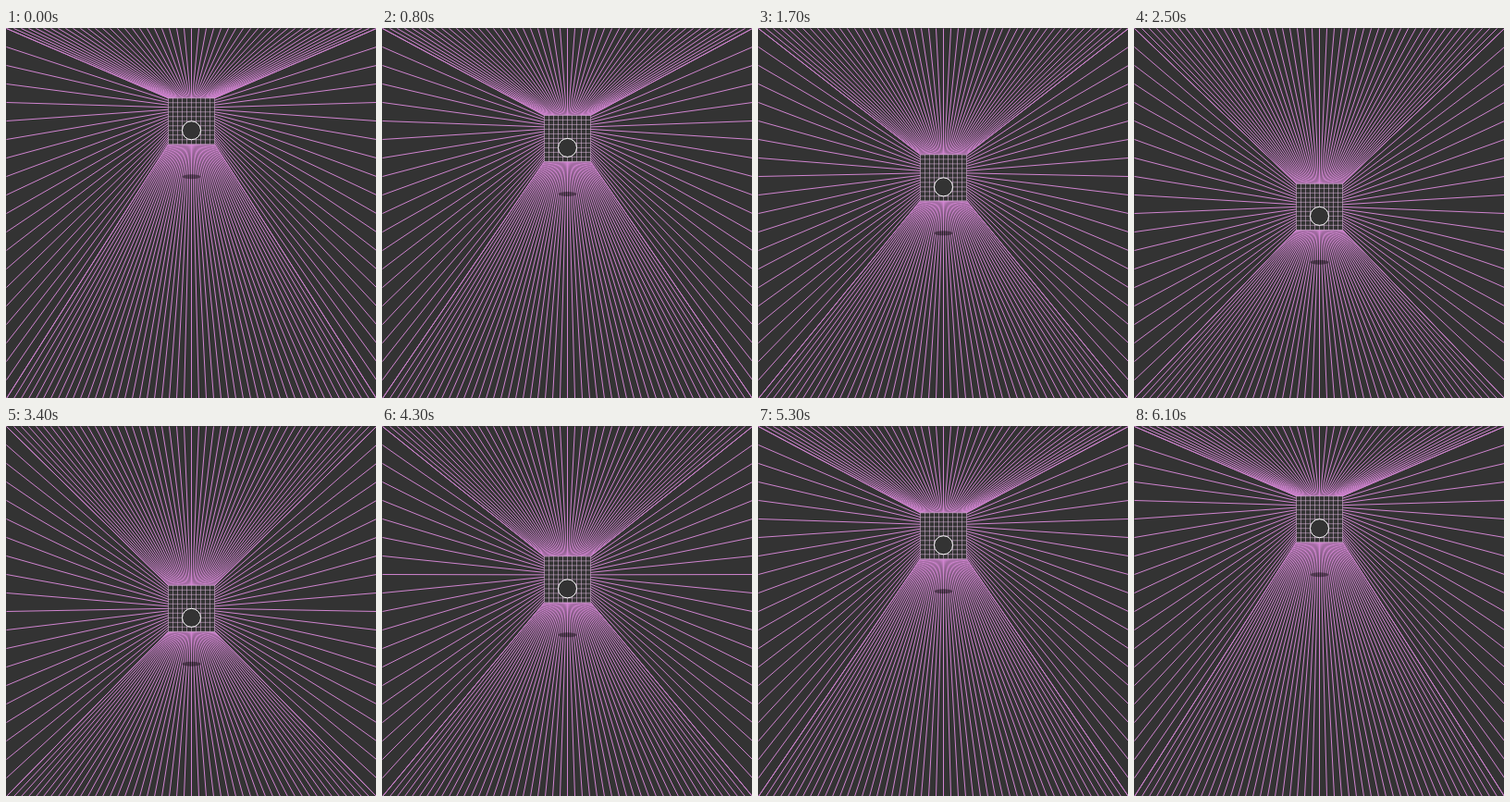
Write an HTML page with a canvas that moves like this. It is 400 px wide and 400 px high and loops after 6200 ms.

```html
<!DOCTYPE html>
<html lang="en">
<head>
<meta charset="utf-8">
<title>Room</title>
<style>
  html, body { margin: 0; width: 100%; height: 100%; overflow: hidden; background: #333; }
  canvas { display: block; }
</style>
</head>
<body>
<canvas id="stage" width="400" height="400"></canvas>
<script>
const ctx = document.getElementById('stage').getContext('2d');
const SIZE = 400, LOOP = 6200, STEP = 100;
const HALF = 25, CX = 200;
const BG = '#333', WALL = '#d084d0', GRID = 'rgba(228,190,228,.5)';

// Each line is stroked on its own so that overlaps build up.
function line(x1, y1, x2, y2) {
  ctx.beginPath();
  ctx.moveTo(x1, y1);
  ctx.lineTo(x2, y2);
  ctx.stroke();
}

function oval(y, rx, ry) {
  ctx.beginPath();
  ctx.ellipse(CX, y, rx, ry, 0, 0, Math.PI * 2);
}

function draw(step) {
  const cy = 150 - 50 * Math.cos((step + 1) / 10);
  const left = CX - HALF, right = CX + HALF;
  const top = cy - HALF, bottom = cy + HALF;

  ctx.setTransform(1, 0, 0, 1, 0, 0);
  ctx.fillStyle = BG;
  ctx.fillRect(0, 0, SIZE, SIZE);
  ctx.translate(0.5, 0.5);
  ctx.lineWidth = 1;

  // Ceiling and floor
  ctx.strokeStyle = WALL;
  for (let i = 0; i <= 50; i++) {
    line(left + i, top, i * 8, 0);
    line(left + i, bottom, i * 8, SIZE);
  }

  // Side walls
  for (let i = 0; i <= 20; i++) {
    const y = top + i * 2.5;
    line(left, y, 0, i * 20);
    line(right, y, SIZE, i * 20);
  }

  // Back wall
  ctx.strokeStyle = GRID;
  for (let i = 0; i <= 50; i += 5) {
    line(left + i, top, left + i, bottom);
    line(left, top + i, right, top + i);
  }

  // Shadow and ball
  oval(cy + 60, 10, 2.5);
  ctx.fillStyle = 'rgba(0,0,0,.4)';
  ctx.fill();
  oval(cy + 10, 10, 10);
  ctx.fillStyle = BG;
  ctx.fill();
  ctx.strokeStyle = '#fff';
  ctx.stroke();
}

const start = performance.now();
let shown = -1;
function tick() {
  const step = Math.floor(((performance.now() - start) % LOOP) / STEP);
  if (step !== shown) draw(shown = step);
  requestAnimationFrame(tick);
}
tick();
</script>
</body>
</html>
```
